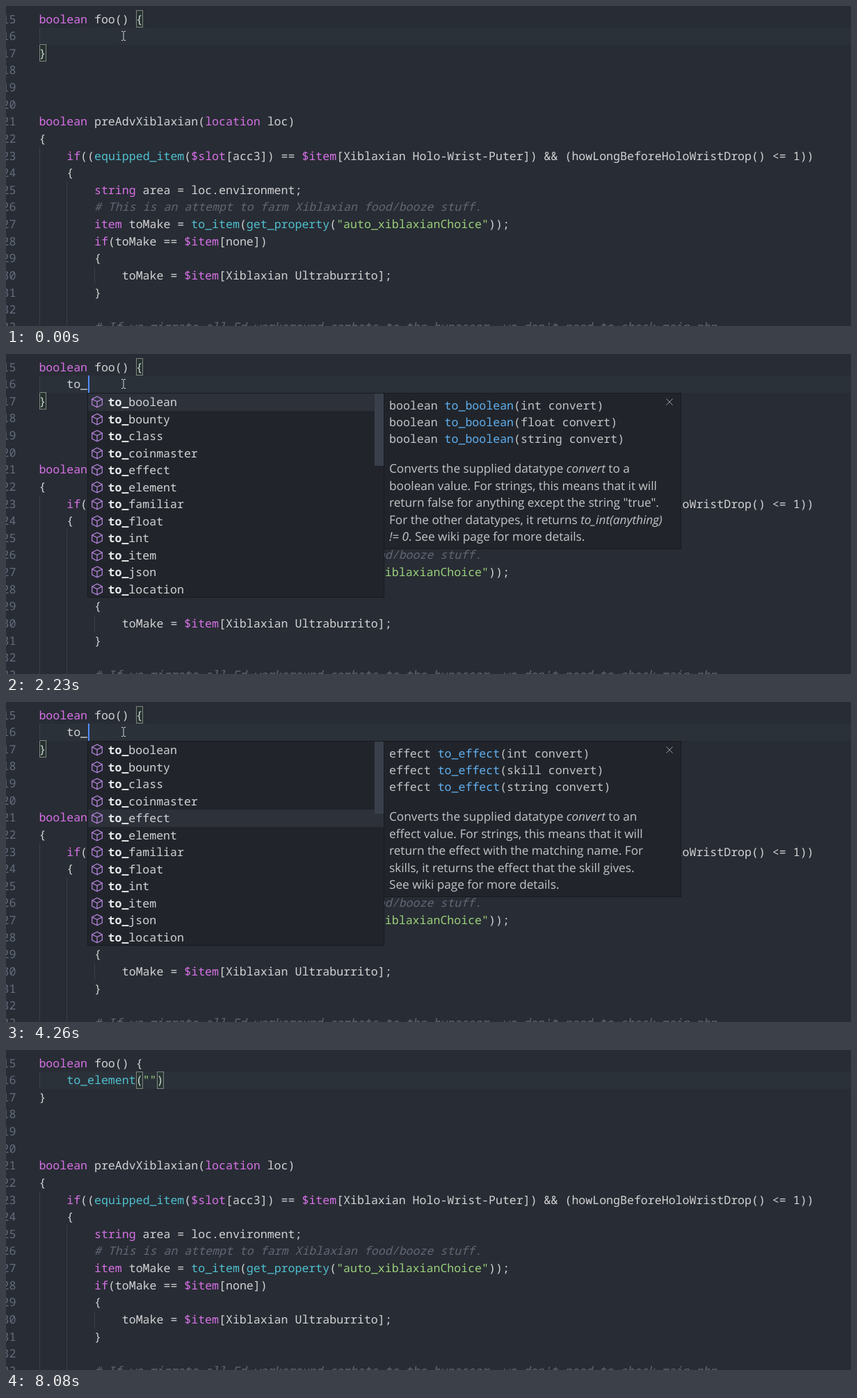
These frames come from a looping animation (1215 by 461 pixels, 8.18 s). An HTML page:

```html
<!DOCTYPE html>
<html lang="en">
<head>
<meta charset="utf-8">
<title>Function completion in a code editor</title>
<style>
  html, body { margin: 0; width: 100%; height: 100%; overflow: hidden; background: #282c34; }
  #stage {
    position: relative; width: 1215px; height: 461px; overflow: hidden;
    color: #d2d3d5; font: 16.58px "Noto Sans Mono", monospace;
    text-rendering: geometricPrecision; font-variant-ligatures: none;
  }
  #stage pre { margin: 0; font: inherit; line-height: 24.62px; }
  #numbers, #code, #brackets i, .guide, #activeLine, #caret, #pointer, .panel { position: absolute; }
  #numbers { left: -5.4px; top: 6.6px; color: #646d7e; }
  #code { left: 47.4px; top: 6.6px; }
  #activeLine { left: 48px; top: 31px; width: 1167px; height: 25px; background: #2b3139; }
  .guide { width: 1px; background: #3b4048; }
  #brackets i { width: 10px; height: 25px; box-sizing: border-box; border: 1px solid #828681; background: rgba(0, 100, 0, .1); }
  #caret { top: 31px; width: 2px; height: 25px; background: #528bff; }
  .keyword { color: #d671e6; }
  .builtin { color: #4fc0cf; }
  .string { color: #9ad07b; }
  .comment { color: #616874; font-style: italic; }

  .panel { top: 56px; box-sizing: border-box; border: 1px solid #181a1f; background: #21252b; overflow: hidden; white-space: pre; }
  #list { width: 427px; height: 295px; }
  .row { position: relative; height: 24.5px; line-height: 24.5px; padding-left: 28.5px; }
  .row.selected { background: #2c313a; }
  .row b { color: #e8e9eb; }
  .row svg { position: absolute; left: 4px; top: 3px; width: 18px; height: 18px; stroke: #b180d7; }
  #scrollbar { position: absolute; right: 0; top: 0; width: 13px; height: 104px; background: #3a404b; }
  #detail { width: 428px; padding: 4.5px 7px 4px; line-height: 24.4px; color: #c4c5c7; }
  #detail span { color: #61afef; }
  #detail p { margin: 19.6px 0 0; font: 17.2px/24.4px "Open Sans", "Noto Sans", sans-serif; }
  #detail svg { position: absolute; right: 11px; top: 7px; width: 10px; height: 10px; stroke: #9a9fa8; }
  svg { fill: none; }
  #pointer { width: 8px; height: 14px; stroke: #d8d8d8; }
</style>
</head>
<body>
<div id="stage">
  <div id="activeLine"></div>
  <div id="brackets"></div>
  <div id="guides"></div>
  <pre id="numbers"></pre>
  <pre id="code"></pre>
  <div id="caret"></div>
  <div id="popup"></div>
  <svg id="pointer" viewBox="0 0 8 14"><path d="M1 .5H3L4 1.5L5 .5H7M4 1.5V12.5M1 13.5H3L4 12.5L5 13.5H7"/></svg>
</div>
<script>
const LOOP = 8180, LEFT = 47.7, CHAR = 9.948, LINE = 24.62, TOP = 6.2;
const $ = id => document.getElementById(id);

const codeBefore = 'boolean foo() {\n    ';
const codeAfter = `
}



boolean preAdvXiblaxian(location loc)
{
    if((equipped_item($slot[acc3]) == $item[Xiblaxian Holo-Wrist-Puter]) && (howLongBeforeHoloWristDrop() <= 1))
    {
        string area = loc.environment;
        # This is an attempt to farm Xiblaxian food/booze stuff.
        item toMake = to_item(get_property("auto_xiblaxianChoice"));
        if(toMake == $item[none])
        {
            toMake = $item[Xiblaxian Ultraburrito];
        }

        # If we migrate all Ed workaround combats to the bypasser, we don't need to check main.php`;

const names = 'boolean bounty class coinmaster effect element familiar float int item json location'.split(' ');

// Documentation of the entries that get selected: parameter lists, then the description.
const docs = {
  boolean: [['int convert', 'float convert', 'string convert'],
    `Converts the supplied datatype <i>convert</i> to a
boolean value. For strings, this means that it will
return false for anything except the string "true".
For the other datatypes, it returns <i>to_int(anything)
!= 0</i>. See wiki page for more details.`],
  bounty: [['string name', 'item convert'],
    'Attempts to convert the specified <i>name</i> to a\nbounty type and returns the result.'],
  class: [['int convert', 'string name'],
    'Attempts to convert the specified <i>name</i> to a\nclass type and returns the result.'],
  coinmaster: [['string store'],
    'Attempts to convert the parameter <i>store</i> to a\ncoinmaster type and returns the result.'],
  effect: [['int convert', 'skill convert', 'string convert'],
    `Converts the supplied datatype <i>convert</i> to an
effect value. For strings, this means that it will
return the effect with the matching name. For
skills, it returns the effect that the skill gives.
See wiki page for more details.`],
  element: [['string name'],
    'Attempts to convert the specified <i>name</i> to an\nelement type and returns the result.'],
};

// [start, typed text, caret column, selected entry]
const edits = [
  [0, '', 4], [1050, 't', 5], [1110, 'to', 6, 0], [1230, 'to_', 7, 0],
  [2350, 'to_', 7, 1], [2970, 'to_', 7, 2], [3520, 'to_', 7, 3],
  [4260, 'to_', 7, 4], [4630, 'to_', 7, 5],
  [5430, 'to_element', 14], [6360, 'to_element()', 15], [6600, 'to_element("")', 16],
];
const caretToggles = [250, 740, 1050, 1730, 2230, 2720, 3210, 3710, 4260, 4680, 5180, 5920, 6360, 7100, 7590, 8080];
// [start, x, y]
const pointerMoves = [[0, 169, 42.5], [7350, 230, 20], [7420, 520, 140], [7500, 800, 290], [7590, 982, 424], [7650, -50, 0]];

const columnX = column => LEFT + column * CHAR;
const latest = (steps, t) => steps.filter(step => step[0] <= t).pop();

function highlight(text) {
  const tokens = /(#.*)|("[^"]*")|(\$\w+|\b(?:boolean|location|string|item|if)\b)|\b(?:equipped_item|to_item|get_property|to_element)\b/g;
  return text.replace(/&/g, '&amp;').replace(/</g, '&lt;').replace(tokens, (match, comment, string, keyword) => {
    const kind = comment ? 'comment' : string ? 'string' : keyword ? 'keyword' : 'builtin';
    return `<span class="${kind}">${match}</span>`;
  });
}

const cube = '<svg viewBox="0 0 16 16"><path stroke-width="1.15" d="M8 1L14.5 4.3V11.7L8 15L1.5 11.7V4.3ZM1.5 4.3L8 7.6L14.5 4.3M8 7.6V15"/></svg>';
const cross = '<svg viewBox="0 0 10 10"><path d="M.5 .5L9.5 9.5M9.5 .5L.5 9.5"/></svg>';

function popupHtml(typed, column, selected) {
  const left = Math.round(columnX(column));
  const rows = names.map((name, i) => {
    const label = 'to_' + name;
    return `<div class="row${i === selected ? ' selected' : ''}">${cube}<b>${typed}</b>${label.slice(typed.length)}</div>`;
  }).join('');
  const name = names[selected], [parameters, description] = docs[name];
  const signatures = parameters.map(p => `<div>${name} <span>to_${name}</span>(${p})</div>`).join('');
  return `<div id="list" class="panel" style="left:${left}px">${rows}
<div id="scrollbar" style="opacity:${typed === 'to' ? .4 : 1}"></div></div>` +
    `<div id="detail" class="panel" style="left:${left + 426}px">${signatures}<p>${description}</p>${cross}</div>`;
}

function bracketBox([line, column]) {
  return `<i style="left:${columnX(column) + .3}px;top:${TOP + line * LINE}px"></i>`;
}

function guide(column, firstLine, lines) {
  const top = Math.round(TOP + firstLine * LINE), height = Math.round(lines * LINE);
  return `<div class="guide" style="left:${Math.round(columnX(column))}px;top:${top}px;height:${height}px"></div>`;
}

$('numbers').textContent = Array.from({ length: 19 }, (_, i) => 15 + i).join('\n');
$('guides').innerHTML = guide(0, 1, 1) + guide(0, 8, 11) + guide(4, 10, 9) + guide(8, 15, 1);

let shownEdit;
function render(t) {
  const edit = latest(edits, t), [, typed, column, selected] = edit;
  if (edit !== shownEdit) {
    shownEdit = edit;
    $('code').innerHTML = highlight(codeBefore + typed + codeAfter);
    const brackets = typed.endsWith(')') ? [[1, 14], [1, 3 + typed.length]] : [[0, 14], [2, 0]];
    $('brackets').innerHTML = brackets.map(bracketBox).join('');
    $('popup').innerHTML = selected === undefined ? '' : popupHtml(typed, column, selected);
    $('caret').style.left = Math.ceil(columnX(column) - .1) + 'px';
  }
  const toggles = caretToggles.filter(time => time <= t).length;
  $('caret').style.visibility = toggles % 2 ? 'visible' : 'hidden';
  const [, x, y] = latest(pointerMoves, t);
  $('pointer').style.left = x - 4 + 'px';
  $('pointer').style.top = y - 7 + 'px';
}

const start = performance.now();
function tick() {
  render((performance.now() - start) % LOOP);
  requestAnimationFrame(tick);
}
tick();
</script>
</body>
</html>
```
